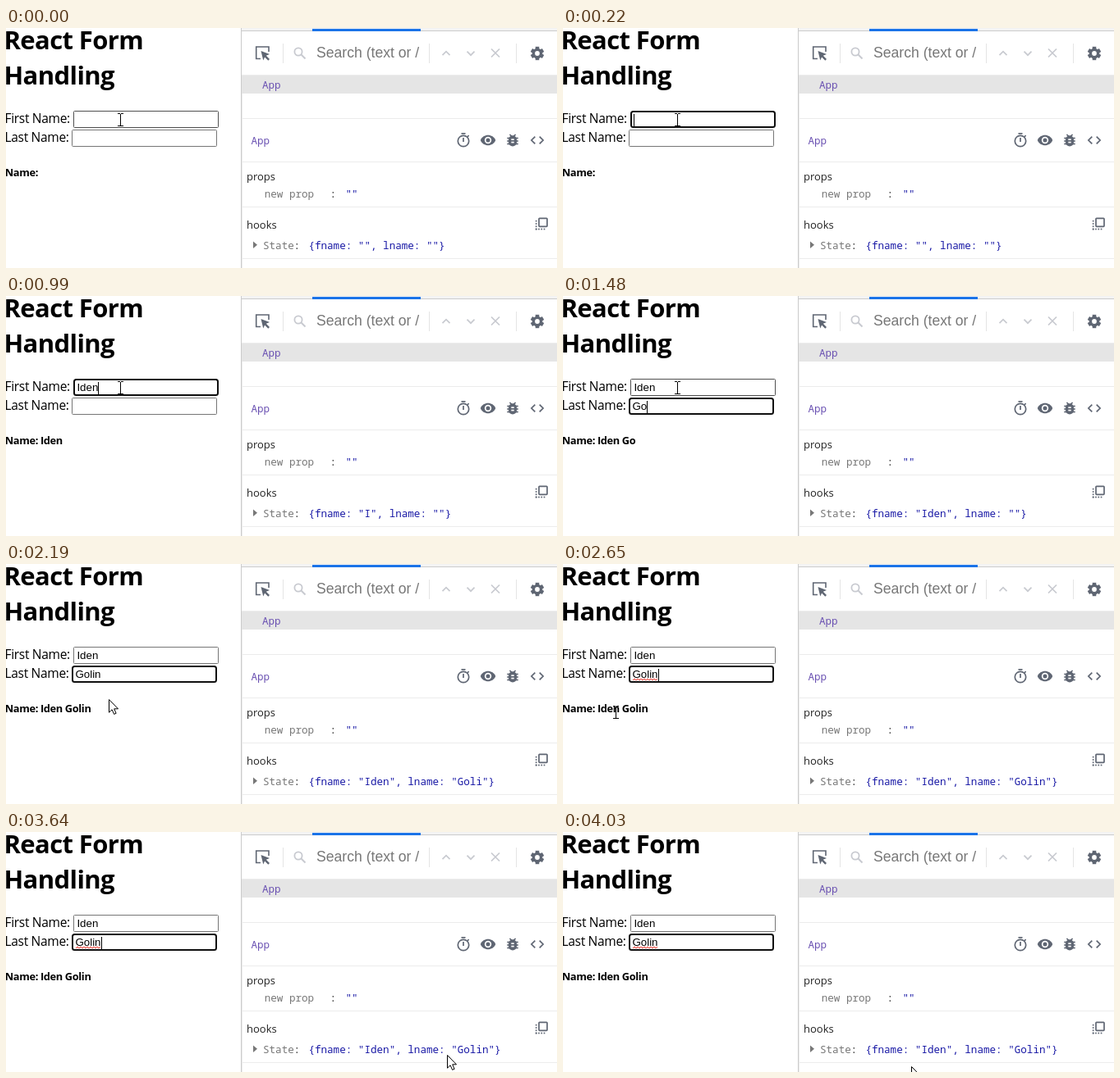
Recreate the animation shown at these times as an HTML page with a canvas. Size 671 px wide and 293 px high, loop 4110 ms.

```html
<!DOCTYPE html>
<html lang="en">
<head>
<meta charset="utf-8">
<title>React Form Handling</title>
<style>
html, body { margin: 0; width: 100%; height: 100%; overflow: hidden; background: #fff; }
canvas { display: block; width: 671px; height: 293px; }
</style>
</head>
<body>
<canvas id="stage"></canvas>
<script>
const W = 671, H = 293, LOOP = 4110, STEP = 76;
const SANS = '"Open Sans", sans-serif';
const ARIAL = '"Liberation Sans", Arial, sans-serif';
const MONO = '12.6px "Noto Sans Mono", monospace';
const ICON = '#5f6673', PALE = '#c8cad0', RULE = '#ececec', DIM = '#777', VALUE = '#1a1aa6', PURPLE = '#6a51b2';

const canvas = document.getElementById('stage');
const ctx = canvas.getContext('2d');
const dpr = window.devicePixelRatio || 1;
canvas.width = W * dpr;
canvas.height = H * dpr;

const FIRST = 'Iden', LAST = 'Golin';
const firstKeys = [390, 690, 840, 990];
const lastKeys = [1310, 1480, 1630, 1800, 1950];
const FOCUS = 220, TAB = 1160, SPELL = 2490;
const blinks = [2190, 2570, 3030, 3410, 3870];
// time, letters of the first and last name the inspector shows
const snapshots = [[0, 0, 0], [630, 1, 0], [1070, 4, 0], [1880, 4, 4], [2420, 4, 5]];
const fields = [
  { x: 82, y: 101, w: 177, h: 21, base: 116 },
  { x: 80, y: 124, w: 177, h: 21, base: 139 }
];
// start time, positions, from x, y, to x, y
const legs = [
  [0, 1, 139, 112, 139, 112],
  [70, 2, 262, 158, 190, 134],
  [220, 1, 139, 112, 139, 112],
  [2190, 7, 125, 165, 64, 181],
  [2720, 1, 58, 182, 58, 182],
  [2800, 6, 84, 187, 304, 214],
  [3260, 3, 335, 232, 408, 268],
  [3560, 3, 480, 270, 594, 273],
  [3788, 4, 560, 280, 424, 286]
];

const passed = (times, t) => times.filter(v => v <= t).length;
const latest = (rows, t) => rows.filter(r => r[0] <= t).pop();

function text(str, x, y, font, color, spacing = 0) {
  ctx.font = font;
  ctx.letterSpacing = spacing + 'px';
  ctx.fillStyle = color;
  ctx.fillText(str, x, y);
}

function box(x, y, w, h, color) {
  ctx.fillStyle = color;
  ctx.fillRect(x, y, w, h);
}

function disc(x, y, r, color) {
  ctx.fillStyle = color;
  ctx.beginPath();
  ctx.arc(x, y, r, 0, 7);
  ctx.fill();
}

function ring(x, y, r, color, width) {
  ctx.strokeStyle = color;
  ctx.lineWidth = width;
  ctx.beginPath();
  ctx.arc(x, y, r, 0, 7);
  ctx.stroke();
}

function line(color, width, ...pts) {
  ctx.strokeStyle = color;
  ctx.lineWidth = width;
  ctx.beginPath();
  for (let i = 0; i < pts.length; i += 2) ctx.lineTo(pts[i], pts[i + 1]);
  ctx.stroke();
}

function inspectIcon() {
  line(ICON, 1.6, 310, 37.5, 304.7, 37.5, 304.7, 23, 320, 23, 320, 29);
  ctx.fillStyle = ICON;
  ctx.fill(new Path2D('M310.5 28L321 32L316.8 33.7L321 38.1L319.3 39.7L315.1 35.5L313.3 39.5Z'));
}

function gearIcon(x, y) {
  for (let i = 0; i < 3; i++) {
    const a = i * Math.PI / 3 + Math.PI / 2;
    const dx = 8.2 * Math.cos(a), dy = 8.2 * Math.sin(a);
    line(ICON, 4.6, x - dx, y - dy, x + dx, y + dy);
  }
  disc(x, y, 6.3, ICON);
  disc(x, y, 2.9, '#fff');
}

function timerIcon(x, y) {
  ring(x, y + 1, 6.7, ICON, 1.7);
  box(x - 2.5, y - 9, 5, 1.7, ICON);
  line(ICON, 1.7, x, y - 3, x, y + 2);
  line(ICON, 1.7, x + 4.8, y - 4, x + 6.6, y - 5.8);
}

function eyeIcon(x, y) {
  ctx.fillStyle = ICON;
  ctx.beginPath();
  ctx.moveTo(x - 9.2, y);
  ctx.bezierCurveTo(x - 6, y - 8.3, x + 6, y - 8.3, x + 9.2, y);
  ctx.bezierCurveTo(x + 6, y + 8.3, x - 6, y + 8.3, x - 9.2, y);
  ctx.fill();
  disc(x, y, 4.2, '#fff');
  disc(x, y, 2.5, ICON);
}

function bugIcon(x, y) {
  for (const dy of [-2.5, 1, 4.5]) line(ICON, 1.7, x - 6.7, y + dy, x + 6.7, y + dy);
  line(ICON, 1.7, x - 3.6, y - 7, x, y - 3.6, x + 3.6, y - 7);
  ctx.fillStyle = ICON;
  ctx.beginPath();
  ctx.roundRect(x - 5, y - 5.8, 10, 13.3, 5);
  ctx.fill();
  box(x - 1.7, y - 1.7, 3.4, 1.7, '#fff');
  box(x - 1.7, y + 1.7, 3.4, 1.7, '#fff');
}

function codeIcon(x, y) {
  for (const s of [-1, 1]) line(ICON, 1.7, x + s * 2.7, y - 4.4, x + s * 7.1, y, x + s * 2.7, y + 4.4);
}

// solid square in front of a dotted one
function copyIcon(x, y) {
  ctx.strokeStyle = ICON;
  ctx.lineWidth = 1.7;
  ctx.beginPath();
  ctx.roundRect(x + 4.2, y + 0.8, 10, 10, 0.8);
  ctx.stroke();
  for (let i = 0; i < 4; i++) {
    box(x, y + 3.3 * (i + 1), 1.7, 1.7, ICON);
    box(x + 3.3 * i, y + 13.2, 1.7, 1.7, ICON);
  }
}

function inspector(t) {
  box(286, 0, 1, H, '#cbcbcb');
  box(287, 0, W - 287, 3, '#f3f3f3');
  box(287, 3, W - 287, 1, '#ccc');
  box(373, 1, 132, 3, '#1a73e8');

  inspectIcon();
  for (const x of [337, 515, 621]) box(x, 19, 1, 24, '#e4e4e4');
  ring(356, 29, 4.6, PALE, 1.8);
  line(PALE, 2, 359.5, 32.5, 364.5, 37.5);
  ctx.save();
  ctx.beginPath();
  ctx.rect(370, 10, 133, 40);
  ctx.clip();
  text('Search (text or /', 378, 36, '17.6px ' + ARIAL, DIM);
  ctx.restore();
  line(PALE, 1.7, 531.5, 33.2, 536, 28.7, 540.5, 33.2);
  line(PALE, 1.7, 561.5, 28.7, 566, 33.2, 570.5, 28.7);
  line(PALE, 1.7, 591, 25.5, 601, 35.5);
  line(PALE, 1.7, 601, 25.5, 591, 35.5);
  gearIcon(647, 31);

  box(287, 58, W - 287, 22, '#e5e5e5');
  box(287, 80, 1, H - 80, RULE);
  for (const y of [57, 110, 163, 218, 281]) box(287, y, W - 287, 1, RULE);
  text('App', 312, 74, MONO, PURPLE);
  text('App', 298.5, 142, MONO, PURPLE);
  timerIcon(557, 137);
  eyeIcon(587, 137);
  bugIcon(617, 137);
  codeIcon(647, 137);

  text('props', 293, 186, '13px ' + SANS, '#222');
  text('new prop', 314.7, 206.5, MONO, DIM);
  text(':', 394.5, 206.5, MONO, '#333');
  text('""', 413.5, 206.5, MONO, VALUE);

  text('hooks', 293, 245, '13px ' + SANS, '#222');
  copyIcon(644.8, 231.5);
  ctx.fillStyle = DIM;
  ctx.fill(new Path2D('M301 260.5L306 264.8L301 269Z'));
  text('State', 313, 269.5, MONO, DIM);
  text(':', 350.5, 269.5, MONO, '#333');
  const [, f, l] = latest(snapshots, t);
  text(`{fname: "${FIRST.slice(0, f)}", lname: "${LAST.slice(0, l)}"}`, 368.4, 269.5, MONO, VALUE);
}

function inside(f, p) {
  return p.x >= f.x && p.x <= f.x + f.w && p.y >= f.y && p.y <= f.y + f.h;
}

function field(f, value, focused, hover, caret) {
  ctx.beginPath();
  if (focused) {
    ctx.strokeStyle = '#101010';
    ctx.lineWidth = 2;
    ctx.roundRect(f.x + 1, f.y + 1, f.w - 2, f.h - 2, 2.5);
  } else {
    ctx.strokeStyle = hover ? '#4f4f4f' : '#767676';
    ctx.lineWidth = 1;
    ctx.roundRect(f.x + 0.5, f.y + 0.5, f.w - 1, f.h - 1, 1);
  }
  ctx.stroke();
  text(value, f.x + 4.4, f.base, '13.33px ' + ARIAL, '#000');
  const end = f.x + 4.4 + ctx.measureText(value).width;
  if (focused && caret) box(Math.round(end), f.y + 4, 1, 15, '#000');
  return end;
}

function squiggle(x0, x1, y) {
  ctx.strokeStyle = '#e8352c';
  ctx.lineWidth = 1;
  ctx.beginPath();
  for (let x = x0, up = 0; x <= x1; x += 2, up = 1 - up) ctx.lineTo(x, y + (up ? -1 : 1));
  ctx.stroke();
}

function form(t, p) {
  const first = FIRST.slice(0, passed(firstKeys, t));
  const last = LAST.slice(0, passed(lastKeys, t));
  const caret = passed(blinks, t) % 2 === 0;
  text('React Form', -2.5, 26, 'bold 31px ' + SANS, '#000', -0.6);
  text('Handling', -2.5, 69, 'bold 31px ' + SANS, '#000', -0.6);
  text('First Name:', -1.5, 116, '15.5px ' + SANS, '#000', -0.3);
  text('Last Name:', -1.5, 139, '15.5px ' + SANS, '#000', -0.3);
  field(fields[0], first, t >= FOCUS && t < TAB, inside(fields[0], p), caret);
  const end = field(fields[1], last, t >= TAB, inside(fields[1], p), caret);
  if (t >= SPELL) squiggle(85, end, 141);
  text(`Name: ${first} ${last}`, -1.2, 181, 'bold 12.8px ' + SANS, '#000', -0.35);
}

function pointer(t) {
  const [start, n, x0, y0, x1, y1] = latest(legs, t);
  const k = Math.min(n - 1, Math.floor((t - start) / STEP));
  const u = n > 1 ? k / (n - 1) : 0;
  const e = u * u * (3 - 2 * u);
  return { x: Math.round(x0 + (x1 - x0) * e), y: Math.round(y0 + (y1 - y0) * e) };
}

function drawPointer(p) {
  const overName = p.x < 107 && p.y > 167 && p.y < 186;
  ctx.save();
  ctx.translate(p.x, p.y);
  if (overName || fields.some(f => inside(f, p))) {
    box(0, -7, 1, 15, '#000');
    for (const y of [-8, 7]) {
      box(-3, y, 3, 1, '#000');
      box(1, y, 3, 1, '#000');
    }
  } else {
    const arrow = new Path2D('M.5 .5V16.2L4.1 12.8L6.6 18.4L9.1 17.3L6.7 11.8H11.5Z');
    ctx.fillStyle = '#fff';
    ctx.fill(arrow);
    ctx.strokeStyle = '#000';
    ctx.lineWidth = 1;
    ctx.stroke(arrow);
  }
  ctx.restore();
}

const begin = performance.now();
function frame() {
  const t = (performance.now() - begin) % LOOP;
  ctx.setTransform(dpr, 0, 0, dpr, 0, 0);
  box(0, 0, W, H, '#fff');
  const p = pointer(t);
  form(t, p);
  inspector(t);
  drawPointer(p);
  requestAnimationFrame(frame);
}
frame();
</script>
</body>
</html>
```
